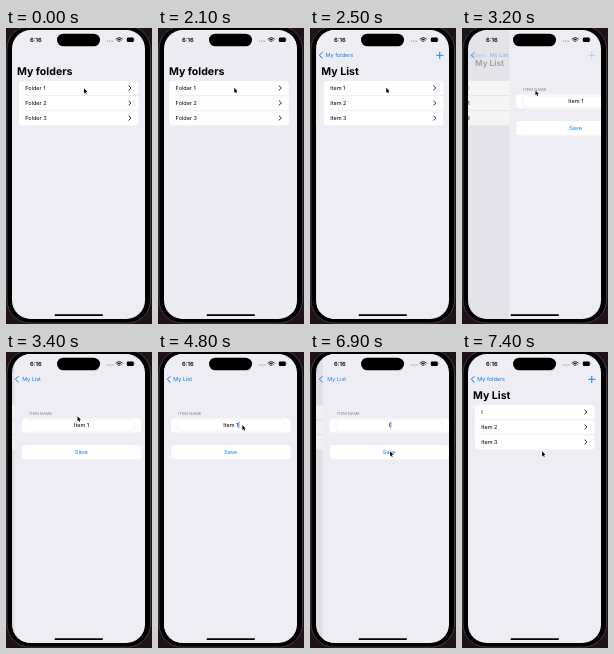
Animation, 146 px wide and 296 px high, one loop 8 s. Source, as an HTML page with a canvas:

```html
<!DOCTYPE html>
<html lang="en">
<head>
<meta charset="utf-8">
<title>Folders</title>
<style>
html, body { margin: 0; width: 100%; height: 100%; overflow: hidden; background: #000; }
canvas { display: block; width: 146px; height: 296px; }
</style>
</head>
<body>
<canvas id="stage"></canvas>
<script>
const W = 146, H = 296, LOOP = 8000;
const BG = '#eeedf4', BLUE = '#067bee', INK = '#000';
const canvas = document.getElementById('stage');
const c = canvas.getContext('2d');
const dpr = window.devicePixelRatio || 1;
canvas.width = W * dpr;
canvas.height = H * dpr;

const clamp = v => Math.max(0, Math.min(1, v));
const mix = (a, b, p) => a + (b - a) * p;

// Critically damped spring from 0 to 1
function spring(ms) {
  if (ms <= 0) return 0;
  if (ms >= 750) return 1;
  const k = ms * 0.017;
  return 1 - (1 + k) * Math.exp(-k);
}

// Value of the last [time, value] pair reached
const stepAt = (keys, t) => keys.filter(k => k[0] <= t).pop()[1];

function box(x, y, w, h, r, fill, stroke, lw = 1) {
  c.beginPath();
  c.roundRect(x, y, w, h, r);
  if (fill) { c.fillStyle = fill; c.fill(); }
  if (stroke) { c.strokeStyle = stroke; c.lineWidth = lw; c.stroke(); }
}

function line(points, color, lw) {
  c.beginPath();
  points.forEach(([x, y]) => c.lineTo(x, y));
  c.strokeStyle = color;
  c.lineWidth = lw;
  c.stroke();
}

function text(s, x, y, size = 5.5, color = INK, weight = 400, align = 'left') {
  c.font = `${weight} ${size}px Inter, sans-serif`;
  c.textAlign = align;
  c.fillStyle = color;
  c.fillText(s, x, y);
}

function faded(alpha, draw) {
  c.save();
  c.globalAlpha = clamp(alpha);
  draw();
  c.restore();
}

function list(rows) {
  box(13, 53, 119.5, 44.5, 3.4, '#fff');
  rows.forEach((row, i) => {
    const y = 60 + i * 15;
    text(row, 19.3, y + 2);
    line([[122.8, y - 2.1], [125, y], [122.8, y + 2.1]], INK, 0.8);
    if (i) line([[19.3, y - 7.4], [132.5, y - 7.4]], '#dcdce0', 0.5);
  });
}

function form(value, caret) {
  text('ITEM NAME', 20, 62.6, 4.1, '#86868c');
  box(13, 66.5, 119.5, 14, 3.4, '#fff');
  box(19.3, 68, 106.5, 11, 1.8, '#fff', '#e4e4e7', 0.5);
  text(value, 72.7, 75, 5.5, INK, 400, 'center');
  if (caret) {
    const x = 73 + c.measureText(value).width / 2;
    box(x, 69.8, 0.8, 6.6, 0.4, '#3478f6');
  }
  box(13, 93, 119.5, 14.3, 3.4, '#fff');
  text('Save', 72.5, 102.2, 5.5, BLUE, 400, 'center');
}

function backButton(label, dx) {
  line([[12.2, 24.3], [9.4, 27.2], [12.2, 30.1]], BLUE, 1);
  text(label, 15.3 + dx, 29.3, 5.5, BLUE);
}

function plus() {
  line([[126.5, 27.3], [133, 27.3]], BLUE, 0.9);
  line([[129.75, 24], [129.75, 30.6]], BLUE, 0.9);
}

function view(draw, dx) {
  c.save();
  c.translate(dx, 0);
  c.fillStyle = BG;
  c.fillRect(6, 0, 134, H);
  draw();
  c.restore();
}

// Navigation from page a to page b at progress p
function push(a, b, p) {
  view(a.body, -40 * p);
  c.fillStyle = `rgba(0,0,0,${0.06 * p})`;
  c.fillRect(0, 0, W, H);
  view(b.body, 133 * (1 - p));

  const q = p * p;
  faded(1 - 1.5 * q, () => {
    text(a.title, mix(11, 15.3, q), mix(46.8, 29.3, q), mix(10.6, 5.5, q), '#000', 700);
    if (a.back) backButton(a.back, -40 * q);
    if (a.plus) plus();
  });
  if (b.title) text(b.title, 11 + 150 * (1 - p) ** 1.2, 46.8, 10.6, '#000', 700);
  faded(q, () => {
    backButton(b.back, 40 * (1 - p));
    if (b.plus) plus();
  });
}

function statusBar() {
  text('6:16', 24, 14, 5.8, '#000', 600);
  box(51, 5.7, 43, 12.6, 6.3, '#000');
  for (let i = 0; i < 4; i++) box(101.2 + i * 1.7, 12.6, 1, 1, 0.5, '#77777c');
  c.strokeStyle = '#000';
  c.lineWidth = 0.9;
  for (const r of [1.1, 2.7, 4.3]) {
    c.beginPath();
    c.arc(113.2, 14, r, -Math.PI * 0.76, -Math.PI * 0.24);
    c.stroke();
  }
  box(120.8, 9.6, 7, 4.4, 1.2, '#000');
  box(128.3, 11, 0.6, 1.6, 0.3, '#88888c');
}

const PATH = [
  [0, 78, 60.3], [880, 78, 60.3], [1000, 76.2, 59.8], [2950, 76.2, 59.8],
  [3400, 71.5, 64.3], [3800, 84.3, 73], [5950, 84.3, 73], [6200, 91.5, 78],
  [6750, 80, 99.3], [LOOP, 80, 99.3]
];

function pointer(t) {
  const i = PATH.findIndex(k => k[0] > t);
  const [t0, x0, y0] = PATH[i - 1], [t1, x1, y1] = PATH[i];
  let p = (t - t0) / (t1 - t0);
  p = p * p * (3 - 2 * p);
  c.save();
  c.translate(mix(x0, x1, p), mix(y0, y1, p));
  c.beginPath();
  [[0, 0], [0, 4.9], [1.1, 3.9], [1.9, 5.7], [2.7, 5.3], [1.9, 3.6], [3.4, 3.5]]
    .forEach(([x, y]) => c.lineTo(x, y));
  c.closePath();
  c.strokeStyle = '#fff';
  c.lineWidth = 0.9;
  c.stroke();
  c.fillStyle = '#000';
  c.fill();
  c.restore();
}

const NAME = [[0, 'Item 1'], [4900, 'Item '], [5000, 'Item'], [5200, 'Ite'], [5300, 'It'], [5500, 'I']];
const CARET = [[0, false], [4000, true], [7400, false]];

function draw(t) {
  const name = stepAt(NAME, t);
  const folders = {
    title: 'My folders',
    body: () => list(['Folder 1', 'Folder 2', 'Folder 3'])
  };
  const items = {
    title: 'My List', back: 'My folders', plus: true,
    body: () => list([name, 'Item 2', 'Item 3'])
  };
  const editor = { back: 'My List', body: () => form(name, stepAt(CARET, t)) };

  c.setTransform(dpr, 0, 0, dpr, 0, 0);
  c.textRendering = 'geometricPrecision';
  c.lineCap = c.lineJoin = 'round';
  c.fillStyle = '#1f1219';
  c.fillRect(0, 0, W, H);
  box(1, -2, 143.5, 297, 23, '#000', '#4a4a4f', 0.8);

  c.save();
  c.beginPath();
  c.roundRect(6, 2, 133, 289, 18.7);
  c.clip();
  if (t < 2900) push(folders, items, spring(t - 2082));
  else push(items, editor, t < 6880 ? spring(t - 3060) : 1 - spring(t - 6880));
  statusBar();
  box(48.5, 286.2, 48.5, 1.8, 0.9, '#000');
  c.restore();
  pointer(t);
}

function frame() {
  draw(performance.now() % LOOP);
  requestAnimationFrame(frame);
}
frame();
</script>
</body>
</html>
```
